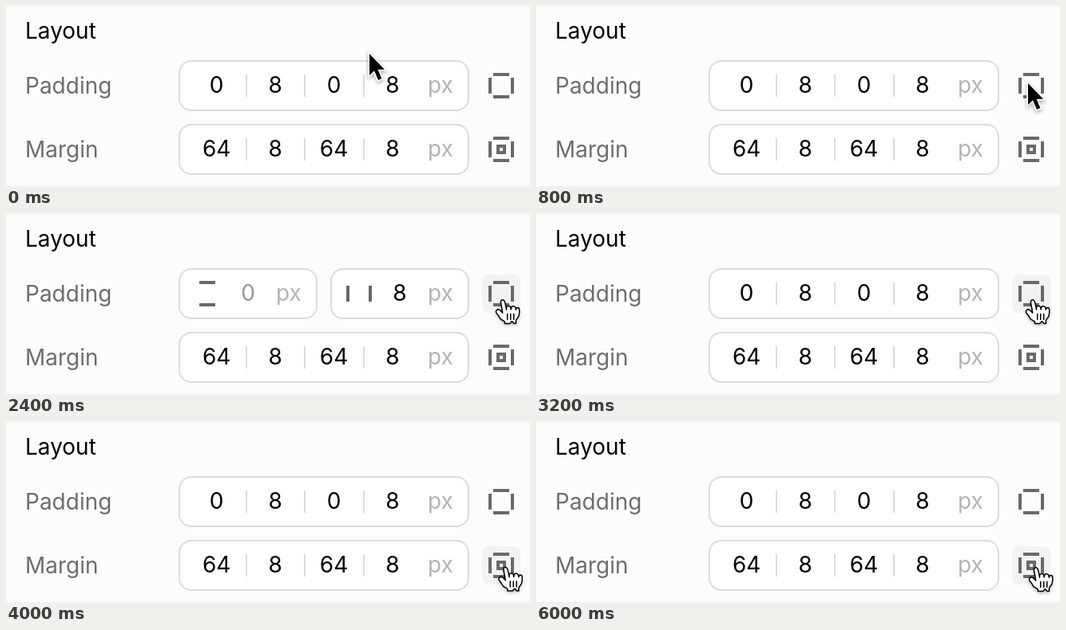
An HTML page with a canvas that plays this animation: 656 px wide and 226 px high, repeating every 7000 ms.

```html
<!DOCTYPE html>
<html lang="en">
<head>
<meta charset="utf-8">
<title>Layout controls</title>
<style>
  html, body { margin: 0; width: 100%; height: 100%; overflow: hidden; background: #fcfcfc; }
  canvas { display: block; }
</style>
</head>
<body>
<canvas id="stage" width="656" height="226"></canvas>
<script>
const ctx = document.getElementById('stage').getContext('2d');
const LOOP = 7000, STEP = 100;
const INK = '#000', LABEL = '#6d6d6d', ICON = '#696969', UNIT = '#b4b4b4', EMPTY = '#999', LINE = '#dcdcdc';

// Pointer stops: time, x, y
const stops = [
  [0, 455, 60], [800, 616, 97], [1100, 619, 99.5], [1800, 619, 99.5],
  [2100, 621, 107.5], [3200, 621, 107.5], [3600, 630.5, 189.5],
  [3900, 625.5, 183.5], [4000, 624.5, 182], [5000, 624.5, 182],
  [5100, 625, 182.5], [LOOP, 625, 182.5]
];

const arrow = new Path2D('M0 0V27L6 21.3 11 33 15.4 31.1 10.5 19.8H19Z');
const hand = new Path2D(
  'M11.3 20.4L10.1 18.4 8.6 16.5Q8.2 15.7 8.8 14.9Q9.9 13.9 11.3 15.1L12.6 16.6 12.2 13.9 11.5 10.5' +
  'Q11.3 9.2 11.8 8.7Q12.5 8.2 13.1 8.5Q13.8 9 14 9.8L14.5 11.8 15 14.6' +
  'Q14.8 12.6 15.7 12.3Q16.8 12 17.4 12.7Q17.8 13.3 17.8 14.5Q17.9 12.8 18.8 12.4' +
  'Q20 12.1 20.5 12.9Q20.8 13.5 20.9 14.6Q21.1 13.5 21.9 13.3Q23 13.3 23.1 14.5V16.4' +
  'Q23 18.6 22.2 19.5Q21 20.8 21 21.3L20.9 22.3 21 23.2Q20 23.4 19.6 23.1L18.8 22.1' +
  'Q18.4 21.7 18.1 22.1Q17.5 23.2 17 23.2H13.9Q14.1 22.2 13.7 21.8Z');
const creases = new Path2D('M15.6 17.3V20.7M17.6 17.3V20.7M19.6 17.3V20.7');

function pointerAt(t) {
  const i = stops.findIndex((s, n) => n > 0 && t <= s[0]);
  const [t0, x0, y0] = stops[i - 1], [t1, x1, y1] = stops[i];
  const p = (t - t0) / (t1 - t0), e = p * p * (3 - 2 * p);
  return { x: x0 + (x1 - x0) * e, y: y0 + (y1 - y0) * e };
}

function text(str, x, y, color, align = 'center') {
  ctx.fillStyle = color;
  ctx.textAlign = align;
  ctx.fillText(str, x, y);
}

function rect(x, y, w, h, color) {
  ctx.fillStyle = color;
  ctx.fillRect(x, y, w, h);
}

function field(x, y, w) {
  ctx.beginPath();
  ctx.roundRect(x + 1, y - 31, w - 2, 62, 15);
  ctx.fillStyle = '#fff';
  ctx.fill();
  ctx.lineWidth = 2;
  ctx.strokeStyle = LINE;
  ctx.stroke();
}

function rowBars(x, y) {
  rect(x, y - 16, 20, 4, ICON);
  rect(x, y + 12, 20, 4, ICON);
}

function columnBars(x, y) {
  rect(x, y - 10, 4, 20, ICON);
  rect(x + 28, y - 10, 4, 20, ICON);
}

function toggle(y, hover, filled) {
  if (hover) {
    ctx.beginPath();
    ctx.roundRect(596, y - 24, 48, 48, 8);
    ctx.fillStyle = '#f2f2f2';
    ctx.fill();
  }
  rowBars(610, y);
  columnBars(604, y);
  if (filled) {
    ctx.lineWidth = 4;
    ctx.strokeStyle = ICON;
    ctx.strokeRect(616, y - 4, 8, 8);
  }
}

function row(label, y, vertical, horizontal, split) {
  const base = y + 8.5;
  text(label, 24, y + 10, LABEL, 'left');
  if (split) {
    field(216, y, 174);
    field(406, y, 174);
    rowBars(242, y);
    columnBars(426, y);
    text(vertical, 303, base, vertical === '0' ? EMPTY : INK);
    text('px', 354, base, UNIT);
    text(horizontal, 493, base, INK);
  } else {
    field(216, y, 364);
    [vertical, horizontal, vertical, horizontal].forEach((value, i) => {
      text(value, 263.7 + i * 73.4, base, INK);
      if (i) rect(Math.round(226.6 + i * 73.4), y - 14, 2, 28, LINE);
    });
  }
  text('px', 544, base, UNIT);
}

function shadow(on) {
  ctx.shadowColor = on ? 'rgba(0,0,0,.35)' : 'transparent';
  ctx.shadowBlur = on ? 4 : 0;
  ctx.shadowOffsetY = on ? 2 : 0;
}

function pointer({ x, y }, isHand) {
  ctx.save();
  ctx.lineJoin = 'round';
  shadow(true);
  if (isHand) {
    ctx.translate(x - 24.5, y - 16.5);
    ctx.scale(2, 2);
    ctx.fillStyle = '#fff';
    ctx.fill(hand);
    shadow(false);
    ctx.strokeStyle = INK;
    ctx.lineWidth = 0.75;
    ctx.stroke(hand);
    ctx.lineCap = 'round';
    ctx.stroke(creases);
  } else {
    ctx.translate(x, y);
    ctx.lineJoin = 'miter';
    ctx.strokeStyle = '#fff';
    ctx.lineWidth = 3.5;
    ctx.stroke(arrow);
    shadow(false);
    ctx.fillStyle = INK;
    ctx.fill(arrow);
  }
  ctx.restore();
}

function draw(t) {
  const pos = pointerAt(t);
  const over = y => t >= 1400 && Math.abs(pos.y - y) <= 24;
  rect(0, 0, 656, 226, '#fcfcfc');
  ctx.font = '400 28px Inter, "Liberation Sans", sans-serif';
  text('Layout', 24, 41, INK, 'left');
  row('Padding', 100, '0', '8', t >= 2300 && t < 3200);
  row('Margin', 180, '64', '8', t >= 4300 && t < 6000);
  toggle(100, over(100), false);
  toggle(180, over(180), true);
  pointer(pos, over(100) || over(180));
}

const start = performance.now();
function tick() {
  const t = (performance.now() - start) % LOOP;
  draw(Math.floor(t / STEP) * STEP);
  requestAnimationFrame(tick);
}
tick();
</script>
</body>
</html>
```
